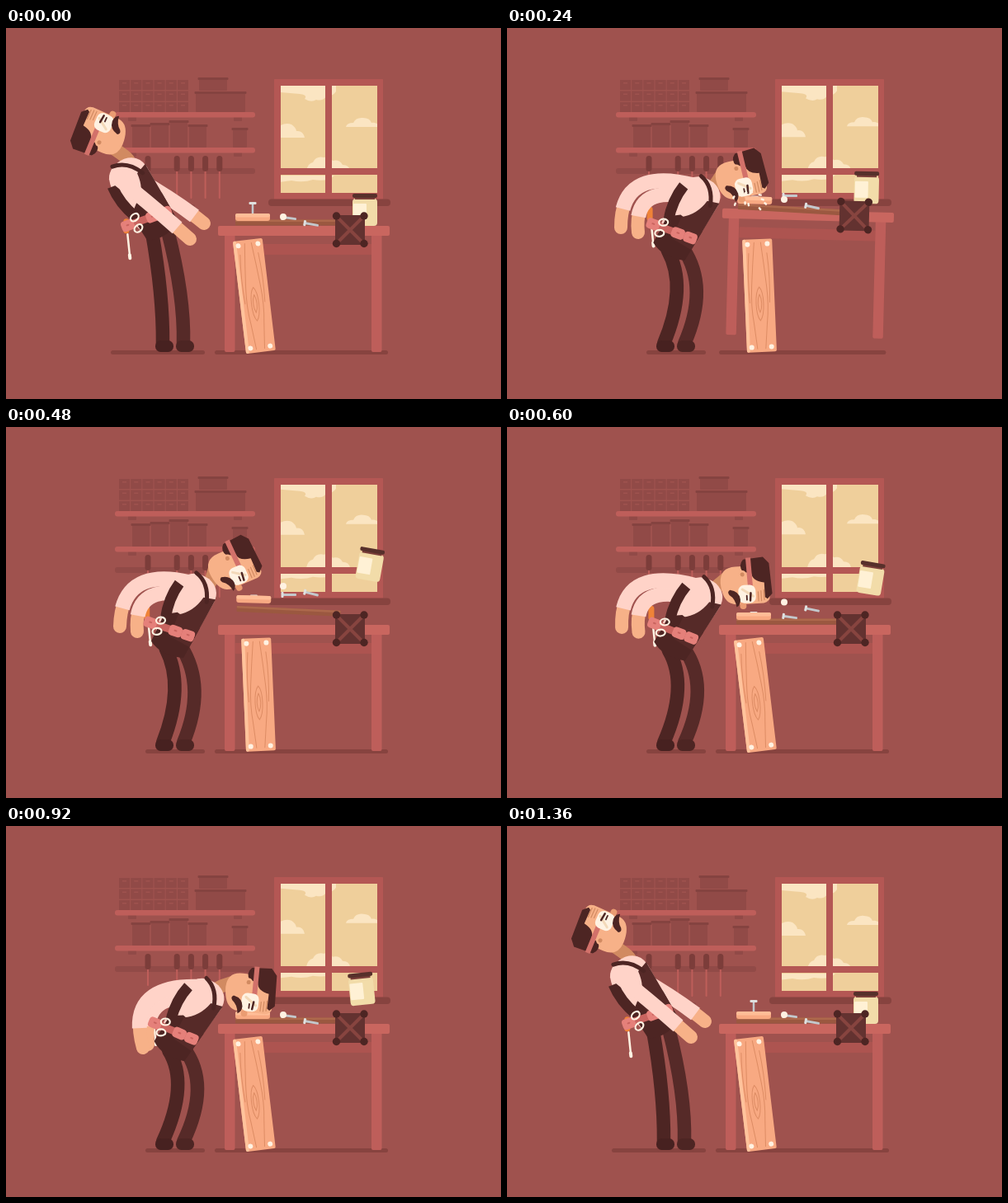
An HTML page with a canvas for the animation above (1400 ms loop, 600x450 px).

```html
<!DOCTYPE html>
<html>
<head>
<meta charset="utf-8">
<title>Carpenter</title>
<style>
html, body { margin: 0; width: 100%; height: 100%; overflow: hidden; background: #9f524e; }
canvas { display: block; }
</style>
</head>
<body>
<canvas id="stage" width="600" height="450"></canvas>
<script>
const ctx = document.getElementById('stage').getContext('2d');
const LOOP = 1400, STEP = 40, HIT = 160, RAD = Math.PI / 180;
const C = {
  bg: '#9f524e', dim: '#914a47', dimmer: '#854340', floor: '#87433f', frame: '#b45754',
  red: '#be5e5a', top: '#c9665f', dark: '#4d2523', darker: '#472120', apron: '#562a28',
  skin: '#f7b188', shade: '#d18a61', shirt: '#ffd3c8', pink: '#e5807a', white: '#fff2e2',
  steel: '#c3c8cc', glass: '#efcf9b', cloud: '#fbe5c2', wood: '#f8a982', grain: '#dd8c64'
};

// Three poses of the man, and what the blow adds to the last one
const BACK = { hip: [182, 238, -30], head: [113, 129, -66], near: [178, 217, 223, 256], far: [203, 210, 240, 237], floor: [187, 127] };
const UP = { hip: [188, 250, 0], head: [203, 132, 0], near: [171, 231, 213, 266], far: [196, 237, 232, 256], floor: [197, 148] };
const SLAM = { hip: [202, 262, 35], head: [297, 199, 97], near: [172, 212, 166, 269], far: [186, 216, 172, 265], floor: [208, 169] };
const REBOUND = { hip: [-4, -4, -7], head: [-24, -37, -34], floor: [-4, 0] };
const FLING = { near: [-12, -20, -28, -27], far: [-11, -10, -13, -17] };

const ramp = (t, from, to) => Math.min(1, Math.max(0, (t - from) / (to - from)));
const smooth = (t, from, to) => { const s = ramp(t, from, to); return s * s * (3 - 2 * s); };
const hop = (t, from, to) => { const s = ramp(t, from, to); return 4 * s * (1 - s); };
const mapPose = (pose, fn) => Object.fromEntries(
  Object.entries(pose).map(([part, values]) => [part, values.map((v, i) => fn(v, part, i))]));
const mix = (a, b, k) => mapPose(a, (v, part, i) => v + (b[part][i] - v) * k);
const add = (pose, delta, k) => mapPose(pose, (v, part, i) => v + (delta[part] ? delta[part][i] * k : 0));

// Lean runs from -1 (back) through 0 (upright) to 1 (down on the table)
function manPose(t) {
  const lean = -1 - .28 * hop(t, 0, 120) + 2 * ramp(t, 80, HIT) - 2 * smooth(t, 980, 1180);
  if (lean < 0) return mix(UP, BACK, -lean);
  const down = add(add(SLAM, REBOUND, hop(t, HIT, 640)), FLING, 1 - smooth(t, 560, 900));
  return mix(UP, down, lean);
}

function at([x, y, deg = 0], draw) {
  ctx.save();
  ctx.translate(x, y);
  ctx.rotate(deg * RAD);
  draw();
  ctx.restore();
}
function box(x, y, w, h, color, r = 0) {
  ctx.fillStyle = color;
  ctx.beginPath();
  ctx.roundRect(x, y, w, h, r);
  ctx.fill();
}
function dot(x, y, r, color) {
  box(x - r, y - r, 2 * r, 2 * r, color, r);
}
function fill(color, d) {
  ctx.fillStyle = color;
  ctx.fill(new Path2D(d));
}
function stroke(color, width, d, cap = 'round') {
  ctx.strokeStyle = color;
  ctx.lineWidth = width;
  ctx.lineCap = cap;
  ctx.lineJoin = 'round';
  ctx.stroke(new Path2D(d));
}
// Bent limb through a joint, drawn up to the given share of its length
function limb(a, mid, b, color, width, end = 1, cap = 'round') {
  const lerp = (p, q) => p.map((v, i) => v + (q[i] - v) * end);
  const ctrl = mid.map((m, i) => 2 * m - (a[i] + b[i]) / 2);
  const c = lerp(a, ctrl), e = lerp(c, lerp(ctrl, b));
  stroke(color, width, `M${a}Q${c} ${e}`, cap);
}

function crate(x, bottom, w, h) {
  box(x, bottom - h, w, h, C.dim, 1);
  box(x - 1.5, bottom - h, w + 3, 3, C.dimmer, 1);
}

function drawShelves() {
  for (let i = 0; i < 18; i++) {
    const x = 137 + i % 6 * 14.2, y = 63 + Math.floor(i / 6) * 13.5;
    box(x, y, 13, 12, C.dim);
    box(x + 4, y + 3, 5, 1.5, C.bg);
  }
  crate(234, 76, 34, 16);
  crate(230, 102, 60, 25);
  [28, 30, 33, 28].forEach((h, i) => crate(153 + i * 23, 145, 21, h));
  crate(275, 145, 17, 24);
  for (const y of [102, 145]) {
    for (const x of [148, 276]) box(x, y + 6, 10, 5, C.dim, 1);
    box(132, y, 170, 6.5, C.red, 3);
  }
  box(132, 170, 170, 7, C.dim, 3);
  for (let i = 0; i < 5; i++) {
    const x = i ? 190 + i * 17.2 : 172;
    stroke(C.red, 2, `M${x} 170V${i ? 206 : 193}`);
    box(x - 3.5, 155, 7, 19, '#7c3d3a', 3.5);
  }
  box(211, 214, 18, 14, C.dim, 2);
  dot(220, 219, 2, C.bg);
}

function drawWindow(t) {
  box(325, 62, 132, 146, C.frame, 1);
  box(333, 70, 117, 130, C.glass);
  ctx.save();
  ctx.beginPath();
  ctx.rect(333, 70, 117, 130);
  ctx.clip();
  ctx.translate(0, 1.5 + 1.5 * Math.cos(2 * Math.PI * t / LOOP));
  fill(C.cloud, 'M333 60H400V74Q396 80 388 80Q384 86 376 84Q370 88 362 83Q366 78 356 77L333 75Z');
  fill(C.cloud, 'M412 117Q413 112 421 112Q424 105 433 106Q441 106 443 112Q448 111 456 117Z');
  fill(C.cloud, 'M330 130V117Q338 111 346 114Q351 117 352 122Q360 121 362 130Z');
  fill(C.cloud, 'M364 170Q366 161 372 160Q376 152 385 154Q392 152 396 158Q404 156 408 163Q416 163 417 170Z');
  fill(C.cloud, 'M330 176H398Q390 184 372 181Q360 185 346 182L330 184Z');
  ctx.restore();
  box(387, 66, 8, 138, C.frame);
  box(329, 170, 125, 8, C.frame);
  box(318, 207.5, 148, 8.5, C.floor, 4);
}

function drawJar(t) {
  const fly = hop(t, HIT, 720), push = fly * ramp(t, HIT, 720), bounce = hop(t, 720, 1100);
  at([435 + 11 * push - 4 * bounce, 221 - 55 * fly - 23 * bounce, 18 * push - 6 * bounce], () => {
    box(-15, -14, 30, 33, '#f2dca9', 4);
    box(-14, -8, 16, 20, '#fff1d5', 1);
    box(-12, -16, 24, 3, '#7a3f3a');
    box(-15, -20, 30, 5, '#57302b', 2);
  });
}

function drawTable() {
  box(-83, 22, 165, 13, '#ad5450');
  for (const x of [-96, 82]) box(x, 10, 12.5, 143, C.red, 2);
  box(-104, 0, 208, 12, C.top, 2);
}

function drawClamp() {
  box(38, -13, 36, 36, '#633230', 2);
  stroke('#87443f', 4, 'M41 -10L71 20M71 -10L41 20');
  for (const x of [39.5, 73]) for (const y of [-12, 21.5]) dot(x, y, 4.7, C.dark);
}

function drawBoard(t) {
  at([309, 393, 6.8 * (hop(t, HIT, 560) - 1)], () => {
    box(-18, -137, 36, 137, C.wood, 2);
    box(-18, -137, 4, 137, '#ffc39c', 2);
    for (const s of [-1, 1])
      stroke(C.grain, 1, `M${4 * s} -133Q${7 * s} -105 ${9 * s} -80Q${11 * s} -56 ${8 * s} -35L${5 * s} -4` +
        `M${11 * s} -120Q${14 * s} -90 ${12 * s} -60`);
    stroke(C.grain, 1, 'M0 -79C6 -72 6 -46 0 -38C-6 -46 -6 -72 0 -79ZM0 -70C3 -64 3 -54 0 -48C-3 -54 -3 -64 0 -70Z');
    for (const x of [-12, 12]) for (const y of [-131, -6]) dot(x, y, 3, C.white);
  });
}

function drawNail(x, y, deg) {
  at([x, y, deg], () => {
    box(-8, -1.5, 17, 3, C.steel, 1);
    box(-9.5, -3.5, 3, 7, '#dfe0df', 1);
  });
}

function drawTools(t) {
  const plank = hop(t, HIT, 540), block = hop(t, HIT, 560);
  const nail = hop(t, HIT, 660), short = hop(t, 150, 570);
  at([340 + 3 * plank, 236 - 24 * plank, 5 * plank], () => {
    box(-62, -3.5, 126, 7, '#9b5840', 1);
    box(-62, -3.5, 126, 2.5, '#ad684c', 1);
  });
  at([299 + 2 * block, 229.5 - 32 * block, 2 * block], () => {
    const y = -18.5 + 13 * (ramp(t, 140, HIT) - smooth(t, 1100, 1220));
    stroke(C.steel, 2.5, `M0 ${y + 2}V-3`, 'butt');
    box(-4.5, y, 9, 3, '#e1e1df', 1);
    box(-21, -4.5, 42, 9, C.wood, 3);
    box(-21, -4.5, 42, 4.5, '#ffbd97', 2);
  });
  drawNail(343, 230.5 - 40 * short, 8 - 12 * short);
  dot(336, 229 - 39 * nail, 4, C.white);
  drawNail(370, 238 - 39 * nail, 10 + 4 * nail);
}

function drawDriver() {
  stroke(C.white, 2.5, 'M1 2L4 31');
  stroke(C.white, 4, 'M3.5 27L4 31');
  box(-4, -17, 7, 18, '#ef8338', 3.5);
}

function drawTorso(lean) {
  fill(C.shirt, 'M-20 -2Q-32 -50 -22 -76Q-14 -90 6 -88Q24 -84 25 -66L24 -2Z');
  stroke(C.dark, 13, 'M-23 -66Q-26 -44 -17 -20', 'butt');
  fill(C.dark, 'M-8 -34L-21 -24L-19 12Q0 22 25 11V-30Z');
  fill(C.apron, 'M25 -70L11 -65Q9 -44 -6 -32L-2 -4H25Z');
  stroke(C.dark, 5, 'M-11 -87Q8 -84 17 -62');
  at([-7, -11, -.35 * lean], () => {
    box(-30, -5, 62, 9, '#c9645f', 2);
    for (const x of [-32, 0, 16]) {
      box(x, -7, 16, 13, C.pink, 4);
      box(x + 6, -2, 4, 2, '#c9645f', 1);
    }
    ctx.strokeStyle = C.white;
    ctx.lineWidth = 2.2;
    for (const y of [-7, 7]) {
      ctx.beginPath();
      ctx.ellipse(-13, y, 5.5, 4, -.4, 0, 7);
      ctx.stroke();
    }
  });
}

function drawHead() {
  fill(C.skin, 'M-19 -24L-19 12Q-19 31 0 31Q20 30 25 20Q28 14 27 4V-20Q26 -28 18 -28Z');
  fill(C.dark, 'M-29 -22L-21 -29L16 -31L22 -25L20 -22L2 -22Q0 -8 -10 -7L-12 3Q-20 9 -27 2Z');
  dot(-9, 4, 5, C.skin);
  dot(-9, 4, 2.5, C.shade);
  stroke(C.shade, 1.2, 'M11 -21H23M12 -17.5H24M13 -14H24');
  stroke('#d2716a', 6, 'M-29 -4L7 -5', 'butt');
  dot(29, 5, 4, '#ea9c72');
  box(4, -11, 22, 21, C.white, 7);
  stroke('#f3d9b9', 3, 'M9 5L18 -8');
  stroke(C.dark, 2.5, 'M14 -5L23 -4');
  stroke(C.dark, 1.8, 'M17 0H22');
  fill(C.dark, 'M9 20Q11 9 21 8Q28 8 30 13Q20 14 15 21Q11 24 9 20Z');
}

function drawMan({ hip, head, near, far, floor }) {
  const [hx, hy, lean] = hip, knee = floor[0];
  const spot = ([ox, oy, deg], x, y) => {
    const c = Math.cos(deg * RAD), s = Math.sin(deg * RAD);
    return [ox + x * c - y * s, oy + x * s + y * c];
  };
  const arm = ([ex, ey, x, y], shoulder) => {
    limb(shoulder, [ex, ey], [x, y], C.skin, 16);
    dot(...shoulder, 9, C.shirt);
    limb(shoulder, [ex, ey], [x, y], C.shirt, 18, .83, 'butt');
  };
  const nearArm = () => arm(near, spot(hip, -13, -73));
  const leg = (x, y, kneeX, foot, color, shoe) => {
    limb([x, y], [kneeX, 320], [foot, 383], color, 16.5);
    box(foot - 9, 379, 22, 14, shoe, 6.5);
  };

  leg(hx + 14, hy + 8, knee + 24, 215, C.apron, C.dark);
  leg(hx - 5, hy + 10, knee, 190, C.dark, C.darker);
  at([...spot(hip, -36, -9), 0], drawDriver);
  arm(far, spot(hip, 6, -62));
  if (lean > 8) nearArm();
  limb(spot(hip, 8, -82), spot(hip, 9, -88), spot(head, -8, 20), C.shade, 16);
  at(hip, () => drawTorso(lean));
  if (lean <= 8) nearArm();
  at(head, drawHead);
}

function drawSplinters(t) {
  const age = t - HIT;
  if (age < 0 || age > 300) return;
  const reach = 8 + 30 * (1 - Math.exp(-age / 140));
  for (let i = 0; i < 10; i++) {
    const angle = i * 2.4, r = reach * (.7 + .3 * Math.sin(i * 5));
    at([295 + r * Math.cos(angle), 208 + r * .75 * Math.sin(angle), i * 70 + age / 4], () =>
      box(-2.2, -1.2, 4.4, 2.4, age < 160 ? C.white : '#c9837a', 1));
  }
}

function render(t) {
  ctx.fillStyle = C.bg;
  ctx.fillRect(0, 0, 600, 450);
  drawShelves();
  drawWindow(t);

  const pose = manPose(t), start = pose.floor[1];
  const jump = hop(t, 150, 470), shove = jump * ramp(t, 150, 470);
  const table = [361 + 18 * shove, 240 - 23 * jump, 6.3 * shove];
  box(253 + 18 * shove, 391, 210 - 34 * shove, 5, C.floor, 2.5);
  box(start, 391, 241 - start, 5, C.floor, 2.5);

  drawJar(t);
  at(table, drawTable);
  drawTools(t);
  at(table, drawClamp);
  drawBoard(t);
  drawMan(pose);
  drawSplinters(t);
  if (t >= 1040 && t < 1120)
    fill(C.white, 'M253 149Q274 161 289 185L287 187Q272 164 253 149ZM257 167Q272 177 281 191L279 193Q269 178 257 167Z');
}

function frame() {
  render(Math.floor(performance.now() % LOOP / STEP) * STEP);
  requestAnimationFrame(frame);
}
frame();
</script>
</body>
</html>
```
